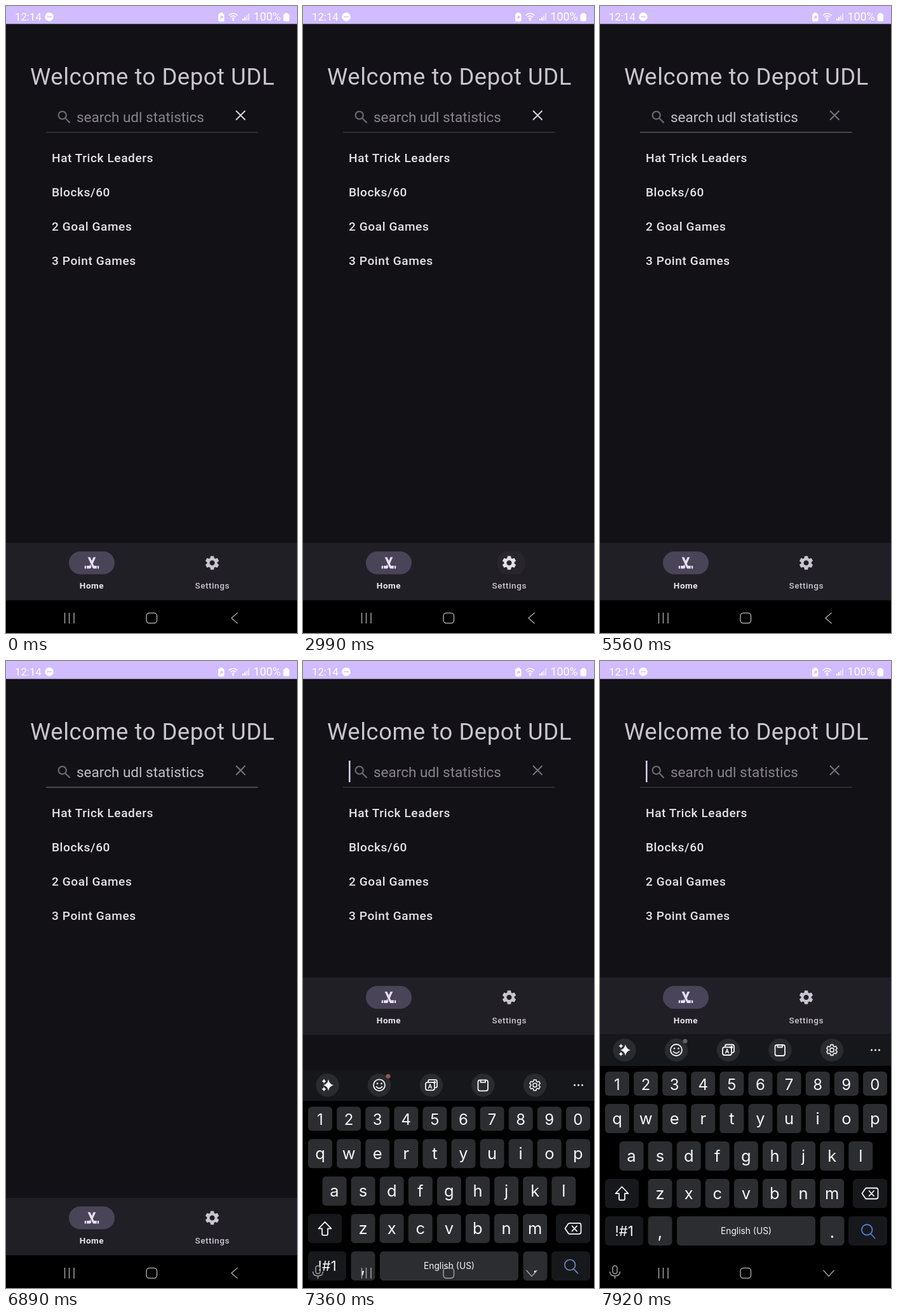
Animation, 458 px wide and 988 px high, one loop 8000 ms. Source, as an HTML page:

```html
<!DOCTYPE html>
<html lang="en">
<head>
<meta charset="utf-8">
<title>Statistics app</title>
<style>
html, body { margin: 0; width: 100%; height: 100%; overflow: hidden; background: #121116; }
svg { display: block; width: 458px; height: 988px; font-family: Roboto, sans-serif; }
.line { fill: none; stroke: #f4f4f6; stroke-width: 1.8; stroke-linecap: round; stroke-linejoin: round; }
.title { font-size: 36.4px; letter-spacing: .56px; fill: #c9c6ce; }
.list { font-size: 19.125px; letter-spacing: .56px; font-weight: 500; fill: #e6e2e8; }
.label { font-size: 13.5px; letter-spacing: .56px; text-anchor: middle; }
.keys { font-family: Inter, sans-serif; fill: #f6f6f8; text-anchor: middle; }
.system { fill: none; stroke: #a2a2a4; stroke-width: 1.5; }
</style>
</head>
<body>
<svg viewBox="0 0 458 988">
  <defs>
    <path id="gear" d="M19.14 12.94c.04-.3.06-.61.06-.94 0-.32-.02-.64-.07-.94l2.03-1.58c.18-.14.23-.41.12-.61l-1.92-3.32c-.12-.22-.37-.29-.59-.22l-2.39.96c-.5-.38-1.03-.7-1.62-.94l-.36-2.54c-.04-.24-.24-.41-.48-.41h-3.84c-.24 0-.43.17-.47.41l-.36 2.54c-.59.24-1.13.57-1.62.94l-2.39-.96c-.22-.08-.47 0-.59.22L2.74 8.87c-.12.21-.08.47.12.61l2.03 1.58c-.05.3-.09.63-.09.94s.02.64.07.94l-2.03 1.58c-.18.14-.23.41-.12.61l1.92 3.32c.12.22.37.29.59.22l2.39-.96c.5.38 1.03.7 1.62.94l.36 2.54c.05.24.24.41.48.41h3.84c.24 0 .44-.17.47-.41l.36-2.54c.59-.24 1.13-.56 1.62-.94l2.39.96c.22.08.47 0 .59-.22l1.92-3.32c.12-.22.07-.47-.12-.61l-2.01-1.58zM12 15.6c-1.98 0-3.6-1.62-3.6-3.6s1.62-3.6 3.6-3.6 3.6 1.62 3.6 3.6-1.62 3.6-3.6 3.6z"/>
    <path id="sticks" d="M2 17v3h2v-4H3c-.55 0-1 .45-1 1zM9 16H5v4l4.69-.01c.38 0 .72-.21.89-.55l.87-1.9-1.59-3.48L9 16zM21.71 16.29A1 1 0 0 0 21 16h-1v4h2v-3c0-.28-.11-.53-.29-.71zM13.6 12.84L17.65 4H14.3l-1.76 3.97-.49 1.1-.05.14L9.7 4H6.35l4.05 8.84 1.52 3.32.08.18 1.42 3.1c.17.34.51.55.89.55L19 20v-4h-4l-1.4-3.16z"/>
    <clipPath id="pills">
      <rect x="99" y="859.5" width="72" height="36" rx="18"/>
      <rect x="288.5" y="859.5" width="72" height="36" rx="18"/>
    </clipPath>
  </defs>
  <rect width="458" height="988" fill="#121116"/>

  <g id="home">
    <g id="content">
      <text class="title" x="38" y="124">Welcome to Depot UDL</text>
      <g fill="none" stroke="#69676d" stroke-width="2.3">
        <circle cx="88.7" cy="172.2" r="6.1"/><path d="M93 176.5l7.6 7.6"/>
      </g>
      <text id="hint" x="111" y="182.5" font-size="22.5">search udl statistics</text>
      <path id="clear" d="M362 165l14.500 14.500m0-14.500l-14.500 14.500" fill="none" stroke-width="2"/>
      <g id="list" class="list"></g>
    </g>
    <rect id="rule" x="63" width="333.5"/>
    <rect id="cursor" x="72" y="157" width="2.6" height="34" fill="#d3cbe6"/>
  </g>
  <text id="settings" x="-2.5" y="95" font-size="62.8" fill="#c9c6ce">SETTINGS</text>

  <rect y="936" width="458" height="52"/>
  <g id="nav">
    <rect y="846" width="458" height="90.5" fill="#211f26"/>
    <rect id="homePill" y="859.5" height="36" rx="18" fill="#4a4458"/>
    <rect id="setPill" y="859.5" height="36" rx="18" fill="#4a4458"/>
    <g clip-path="url(#pills)"><circle id="ripple" fill="#e8e8e0"/></g>
    <use id="homeIcon" href="#sticks" transform="translate(121.5 864) scale(1.125)"/>
    <use id="setIcon" href="#gear" transform="translate(311 864) scale(1.125)"/>
    <text id="homeLabel" class="label" x="135" y="918">Home</text>
    <text id="setLabel" class="label" x="324.7" y="918">Settings</text>
  </g>

  <g id="keyboard">
    <rect y="588" width="458" height="400"/>
    <rect y="588" width="458" height="50" fill="#15171b"/>
    <g id="tools" fill="#292b2f"></g>
    <g fill="#f4f4f6">
      <path d="M40 604q1.500 7.500 8 9q-6.500 1.500-8 9q-1.500-7.500-8-9q6.500-1.500 8-9z"/>
      <path d="M33 603q.6 3 3.500 3.800q-2.900.8-3.500 3.800q-.6-3-3.500-3.800q2.900-.8 3.500-3.800zM33 615.500q.6 3 3.500 3.800q-2.900.8-3.500 3.800q-.6-3-3.500-3.800q2.900-.8 3.500-3.800z"/>
      <circle cx="117" cy="610.5" r="1.3"/><circle cx="123.500" cy="610.5" r="1.3"/>
      <circle cx="427.5" cy="613" r="1.5"/><circle cx="433.5" cy="613" r="1.5"/><circle cx="439.5" cy="613" r="1.5"/>
    </g>
    <g class="line">
      <circle cx="120" cy="613" r="9"/><path d="M115.500 615.500q4.500 5 9 0"/>
      <path d="M197 608v-1.500q0-2 2-2h9q3 0 3 3v7q0 2.500-2.500 2.500M202 604.500h3m-.5 4h4m-1.500-1.500l1.500 1.500l-1.500 1.500"/>
      <rect x="193" y="608.5" width="14" height="12.5" rx="3"/>
      <path d="M197.500 618l2.500-6.500l2.500 6.500m-4-2h3" stroke-width="1.3"/>
      <rect x="275.5" y="605" width="15.5" height="17" rx="3"/>
      <path d="M279.500 605v3.500h7.500v-3.500"/>
      <use href="#gear" transform="translate(354.5 602.5) scale(.875)"/>
    </g>
    <circle id="badge" cx="134" cy="599" r="3.5"/>
    <g id="keys" class="keys"></g>
    <g class="line">
      <path d="M34.500 828.500l10 10.500h-5.500v8.500q0 2-2 2h-5q-2 0-2-2v-8.500h-5.500z"/>
      <path d="M419.500 830.500h15q3 0 3 3v11q0 3-3 3h-15q-1 0-2-1l-5-7.500l5-7.500q1-1 2-1zM423.500 835l7.500 8m0-8l-7.500 8"/>
      <path id="lens" d="M426.500 903l6 6.500M428.500 896.300a8.300 8.300 0 1 1-16.600 0a8.300 8.300 0 1 1 16.600 0"/>
    </g>
  </g>

  <g class="system">
    <path d="M92.500 956v17m7-17v17m7.500-17v17"/>
    <rect x="221" y="956.5" width="16.5" height="16" rx="4.5"/>
    <path id="back" d="M364.500 956l-9.500 8.500l9.500 8.500"/>
    <g id="mic"><rect x="20" y="953" width="7" height="12.5" rx="3.5"/><path d="M15.500 962q0 7 8 7t8-7m-8 7v4.500"/></g>
  </g>

  <rect width="458" height="28.3" fill="#d0bcff"/>
  <g fill="#fff">
    <text x="14" y="23" font-size="16.8">12:14</text>
    <text x="389.5" y="23" font-size="17.8">100%</text>
    <circle cx="68" cy="17" r="6.8"/>
    <rect x="334" y="12" width="9.5" height="12.5" rx="2"/><rect x="336.5" y="10.5" width="4.5" height="3"/>
    <rect x="436.5" y="12.5" width="9.5" height="11.5" rx="2"/><rect x="439" y="11" width="4.5" height="3"/>
    <circle cx="357.5" cy="22" r="1.5"/>
    <path d="M372 20h2v3h-2zm3-2.500h2v5.500h-2z"/>
    <path d="M378 15h2v8h-2zm3-3.500h2v11.500h-2z" opacity=".6"/>
  </g>
  <g fill="none" stroke="#fff" stroke-width="1.4">
    <path d="M350.500 15q7-6.500 14 0m-11.500 2.600q4.500-4 9 0m-6.700 2.400q2.200-2 4.400 0"/>
    <path d="M64.500 17h7M337 20l3.500-3.500m-2.800 0h2.800v2.800" stroke="#d0bcff" stroke-width="1.7"/>
  </g>
</svg>
<script>
const $ = id => document.getElementById(id);
const set = (id, attrs) => { for (const k in attrs) $(id).setAttribute(k, attrs[k]); };
const ramp = (t, start, length) => Math.min(1, Math.max(0, (t - start) / length));
const smooth = p => p * p * (3 - 2 * p);

$('list').innerHTML = ['Hat Trick Leaders', 'Blocks/60', '2 Goal Games', '3 Point Games']
  .map((s, i) => `<text x="72" y="${245.5 + i * 54}">${s}</text>`).join('');
$('tools').innerHTML = [38.5, 120, 202, 283.5, 365]
  .map(x => `<circle cx="${x}" cy="613" r="18.2"/>`).join('');

const key = (x, y, w, h, label = '', size = 25.5, base = 32, fill = '#2c2d31') =>
  `<rect x="${x}" y="${y}" width="${w}" height="${h}" rx="6" fill="${fill}"/>` +
  `<text x="${x + w / 2}" y="${y + base}" font-size="${size}">${label}</text>`;
const row = (chars, x, y, h, size, base) =>
  [...chars].map((c, i) => key(x + i * 45.1, y, 38, h, c, size, base)).join('');
const darkKey = (x, y, w, label) => key(x, y, w, 46, label, 22, 31, '#17181b');
$('keys').innerHTML =
  row('1234567890', 8, 647, 38, 24, 28.5) +
  row('qwertyuiop', 8, 698, 46) +
  row('asdfghjkl', 30.5, 757, 46) +
  row('zxcvbnm', 75.5, 816, 46) +
  darkKey(8, 816, 53) + darkKey(398, 816, 54) +
  darkKey(8, 875, 60, '!#1') + key(75.5, 875, 38, 46, ',', 27, 34) +
  key(121, 875, 218, 46, 'English (US)', 13.8, 28) + key(346.5, 875, 38, 46, '.', 27, 34) +
  darkKey(391, 875, 61);

// Press times of the two tabs, and the moment the search field gets focus
const PRESS_SETTINGS = 2990, PRESS_HOME = 4870, FOCUS = 6890, KEYS_IN = 7150;
const HOLD = 70;

function drawTab(name, center, amount) {
  const w = 72 * smooth(amount), on = amount > 0.5;
  set(name + 'Pill', { x: center - w / 2, width: w, opacity: amount });
  set(name + 'Icon', { fill: on ? '#e8def8' : '#cac6d0' });
  set(name + 'Label', { fill: on ? '#ece7ef' : '#cac6d0', 'font-weight': on ? 700 : 500 });
}

function draw(t) {
  const out = PRESS_SETTINGS + HOLD, back = PRESS_HOME + HOLD;
  const away = smooth(ramp(t, out, 630)) - smooth(ramp(t, back, 620));
  set('home', { opacity: 1 - away });
  set('settings', { opacity: away });

  const crisp = t >= 320 && t < PRESS_SETTINGS;
  const returned = t >= back;
  const bright = returned && t < FOCUS + HOLD;
  set('content', { transform: crisp ? 'translate(.4 0)' : '' });
  set('rule', {
    y: 198, height: crisp ? 1 : 2,
    fill: crisp ? '#504f54' : bright ? '#48474d' : '#2d2c31'
  });
  set('hint', { fill: bright ? '#c2c0c7' : '#87858b' });
  set('clear', { stroke: returned ? '#76747a' : '#d6d4da' });
  set('cursor', { opacity: t >= FOCUS + HOLD ? 1 : 0 });

  const toSet = ramp(t, out, 100) - ramp(t, back, 100);
  drawTab('home', 135, 1 - toSet);
  drawTab('set', 324.5, toSet);
  if (t >= PRESS_SETTINGS && t < out) set('setIcon', { fill: '#e4e0ea' });

  const first = t < PRESS_HOME;
  const age = t - (first ? PRESS_SETTINGS : PRESS_HOME);
  set('ripple', {
    cx: first ? 328 : 124, cy: first ? 877.5 : 886,
    r: Math.max(0, (first ? 22 : 24) + age * 0.2),
    opacity: age < 0 ? 0 : (first ? 0.03 : 0.07) * (1 - ramp(age, 70, 380))
  });

  // The layout jumps to its new height at once; the keys slide in after it
  const typing = t >= KEYS_IN;
  set('nav', { transform: `translate(0 ${typing ? -347.5 : 0})` });
  const left = (1 - ramp(t, KEYS_IN, 437)) ** 3;
  const turn = smooth(ramp(t, KEYS_IN, 180));
  set('keyboard', { transform: `translate(0 ${400 * left})`, opacity: typing ? 1 : 0 });
  set('back', { transform: `rotate(${-90 * turn} 360 964.5)` });
  set('mic', { opacity: turn });
  set('badge', { fill: t < 7450 ? '#8c5a45' : '#626367' });
  set('lens', { stroke: t < 7450 ? '#6f84bd' : '#4f80e2' });
}

function tick() {
  draw(performance.now() % 8000);
  requestAnimationFrame(tick);
}
tick();
</script>
</body>
</html>
```
